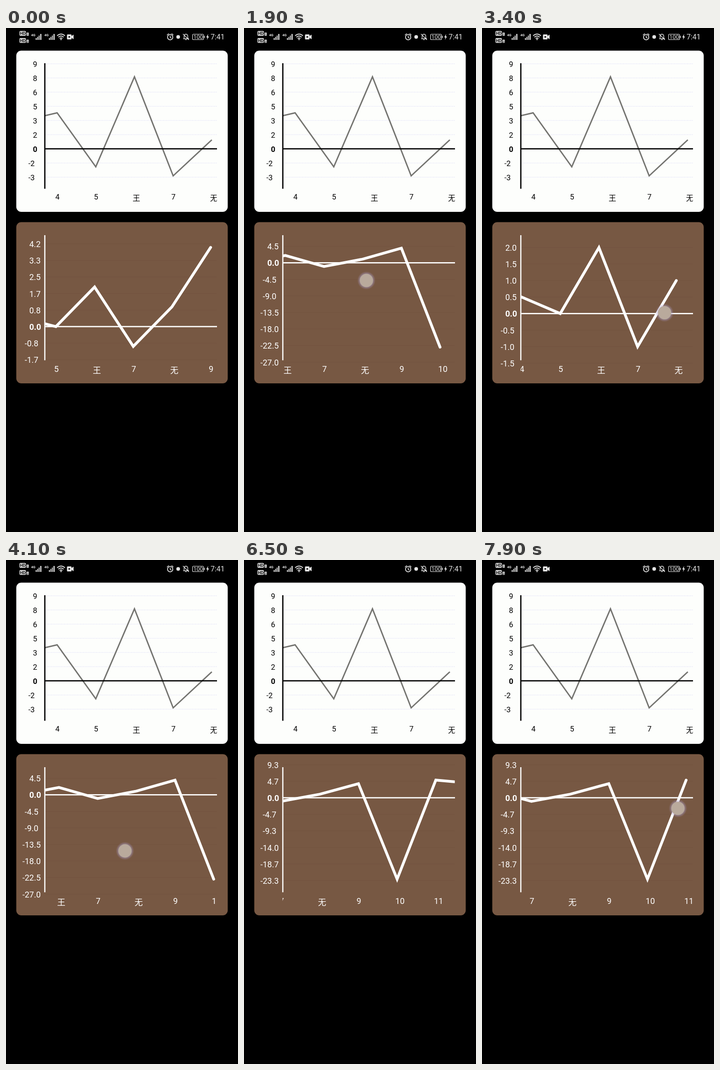
These frames come from a looping animation (508 by 1102 pixels, 8000 ms). An HTML page:

```html
<!DOCTYPE html>
<html lang="zh">
<head>
<meta charset="utf-8">
<title>Scrolling line charts</title>
<style>
  html, body { margin: 0; width: 100%; height: 100%; overflow: hidden; background: #000; }
  svg { display: block; width: 508px; height: 1102px; }
  text { font-family: Roboto, "Noto Sans CJK SC", "Noto Sans CJK", sans-serif; white-space: pre; }
</style>
</head>
<body>
<svg viewBox="0 0 508 1102">
  <defs>
    <clipPath id="plot"><rect x="84.5" y="0" width="377" height="800"/></clipPath>
    <radialGradient id="halo">
      <stop offset=".68" stop-color="#b4aad2" stop-opacity=".6"/>
      <stop offset="1" stop-color="#a08cb4" stop-opacity="0"/>
    </radialGradient>
    <g id="signal" fill="#e4e4e4">
      <text x="0" y="18" font-size="7.500" font-weight="700">4G</text>
      <path d="M10 22h2v4h-2zM13.3 19.500h2v6.500h-2zM16.600 16.500h2v9.500h-2zM20 13h2.500v13h-2.500z"/>
    </g>
    <g id="hd">
      <rect x="29.500" y="6.500" width="14" height="10.500" rx="2" fill="#e4e4e4"/>
      <text x="30.600" y="15.300" font-size="9" font-weight="700">HD</text>
      <rect x="45" y="10" width="5" height="7" rx="1" fill="#ccc"/>
    </g>
  </defs>

  <use href="#hd"/><use href="#hd" y="15.500"/>
  <text x="46" y="16" font-size="6">1</text><text x="46" y="31.500" font-size="6">2</text>
  <use href="#signal" x="55"/><use href="#signal" x="84"/>
  <g fill="none" stroke="#e4e4e4" stroke-width="1.800">
    <path d="M112 17q8.500-7.500 17 0M114.700 20q5.800-5 11.600 0M117.500 23q3-2.500 6 0"/>
    <circle cx="359.500" cy="20" r="5.800"/>
    <path d="M359.500 16.500v4l2.500 1.500M352.500 15.500l4-3.500M366.500 15.500l-4-3.500" stroke-width="1.500"/>
    <path d="M389 23.500h10.500l-1.500-2v-4q-.5-4-4-4t-4 4v4zM392.500 25.500h3M387.500 13l13 13" stroke-width="1.400"/>
    <rect x="408.500" y="13.500" width="24" height="12" rx="2" stroke-width="1.200"/>
  </g>
  <g fill="#e4e4e4">
    <circle cx="120.500" cy="25" r="1.500"/>
    <circle cx="377" cy="19.500" r="4"/>
    <path d="M135 14h7q1.500 0 1.500 1.500v2l4.500-3v10l-4.500-3v2q0 1.500-1.500 1.500h-7q-1.500 0-1.500-1.500v-8q0-1.500 1.500-1.500z"/>
    <path d="M433.500 17h1.500v5h-1.500zM442.500 13l-4 7.500h2.500l-1 5.500 4.500-7.500h-2.500z"/>
    <text x="410.300" y="24" font-size="12.500">100</text>
    <text x="448" y="25.300" font-size="16">7:41</text>
  </g>
  <circle cx="138.500" cy="19.500" r="1.800"/>

  <rect x="22.500" y="49.500" width="463" height="352.500" rx="11" fill="#fdfefc"/>
  <rect x="22.500" y="424.500" width="463" height="352.500" rx="11" fill="#775843"/>
  <g id="light"></g>
  <g id="brown"></g>
  <g id="touch">
    <circle r="20" fill="url(#halo)"/>
    <circle r="14.500" fill="#b9aa9c"/>
  </g>
</svg>
<script>
const LOOP = 8000, STEP = 100, SPACING = 84.7, FIRST = 3;
const NAMES = ['3', '4', '5', '王', '7', '无', '9', '10', '11', '12'];
const $ = id => document.getElementById(id);

const light = {
  values: [3, 4, -2, 8, -3, 1],
  top: 106, height: 216.5, share: 217.5, pitch: 31, parts: 7, digits: 0,
  axis: [77, 351.5], limits: [70, 354], names: [375.3, 378], size: 16.5, left: [59, 49],
  ink: '#000', line: '#747470', width: 3, cap: 'butt', rule: 2.8,
  grid: 'stroke="#dcdcf6" stroke-dasharray="2 1.5"'
};
const brown = {
  values: [0, .5, 0, 2, -1, 1, 4, -23, 5, 4],
  top: 481.7, height: 216.5, share: 214, pitch: 36.17, parts: 6, digits: 1,
  axis: [453, 726.5], limits: [445, 735], names: [752, 755], size: 18, left: [0, 0, 51, 41, 36],
  ink: '#fff', line: '#fff', width: 6, cap: 'round', rule: 2.6,
  grid: 'stroke="#6b4c3a" stroke-opacity=".4"'
};

// Six neighbouring points are drawn, and they alone set the vertical scale.
function chart(c, kingX) {
  const xAt = i => kingX + (i + FIRST - 6) * SPACING;
  let from = 0;
  while (xAt(from) < 0) from++;
  const shown = c.values.slice(from, from + 6);
  const max = Math.max(...shown), range = max - Math.min(...shown);
  const zero = c.top + c.share * max / range;
  const points = shown.map((v, i) => `${xAt(from + i)},${zero - v * c.height / range}`);

  let scale = '';
  for (let k = -9; k < 10; k++) {
    const y = zero - k * c.pitch;
    if (y < c.limits[0] || y > c.limits[1]) continue;
    const label = (k * range / c.parts).toFixed(c.digits);
    if (k) scale += `<path d="M85 ${y}H461.500" ${c.grid}/>`;
    scale += `<text x="${c.left[label.length - 1]}" y="${y + .7 + c.size * .355}" font-size="${c.size}"
      font-weight="${k ? 400 : 700}" fill="${c.ink}">${label}</text>`;
  }
  const names = shown.map((_, i) => {
    const name = NAMES[from + i], y = c.names[name > '9' ? 1 : 0];
    return `<text x="${xAt(from + i) - 4}" y="${y}" font-size="${c.size}" fill="${c.ink}">${name}</text>`;
  }).join('');

  return `${scale}
    <g clip-path="url(#plot)">
      <polyline points="${points.join(' ')}" fill="none" stroke="${c.line}" stroke-width="${c.width}"
        stroke-linecap="${c.cap}" stroke-miterlimit="10"/>${names}
    </g>
    <path d="M85 ${c.axis[0]}V${c.axis[1]}M84 ${zero}H462" stroke="${c.ink}" stroke-width="${c.rule}"/>`;
}

// Each drag: time span, finger path and chart position.
const drags = [
  { t: [700, 1400], x: [372, 268], y: [560, 556], pos: [194, 90.5] },
  { t: [1900, 2700], x: [268, 445], y: [552, 548], pos: [90.5, 262.3] },
  { t: [3300, 4100], x: [406, 260.5], y: [622, 636], pos: [262.3, 116] },
  { t: [4300, 4800], x: [375, 255], y: [620, 629], pos: [116, -3.5] },
  { t: [7300, 7900], x: [400, 429], y: [545, 543], pos: [-3.5, 23.5] }
];
const mix = ([a, b], p) => a + (b - a) * p;

function draw(time) {
  const drag = drags.filter(d => time >= d.t[0]).pop() || drags[0];
  const [start, end] = drag.t;
  const raw = Math.min(1, Math.max(0, (time - start) / (end - start)));
  const p = raw * raw * (3 - 2 * raw);
  $('brown').innerHTML = chart(brown, mix(drag.pos, p));
  $('touch').setAttribute('transform', `translate(${mix(drag.x, p)} ${mix(drag.y, p)})`);
  $('touch').setAttribute('visibility', time >= start && time <= end + 100 ? 'visible' : 'hidden');
}

$('light').innerHTML = chart(light, 281.3);
let last = -1;
function tick(now) {
  const time = Math.floor(now % LOOP / STEP) * STEP;
  if (time !== last) draw(last = time);
  requestAnimationFrame(tick);
}
draw(0);
requestAnimationFrame(tick);
</script>
</body>
</html>
```
